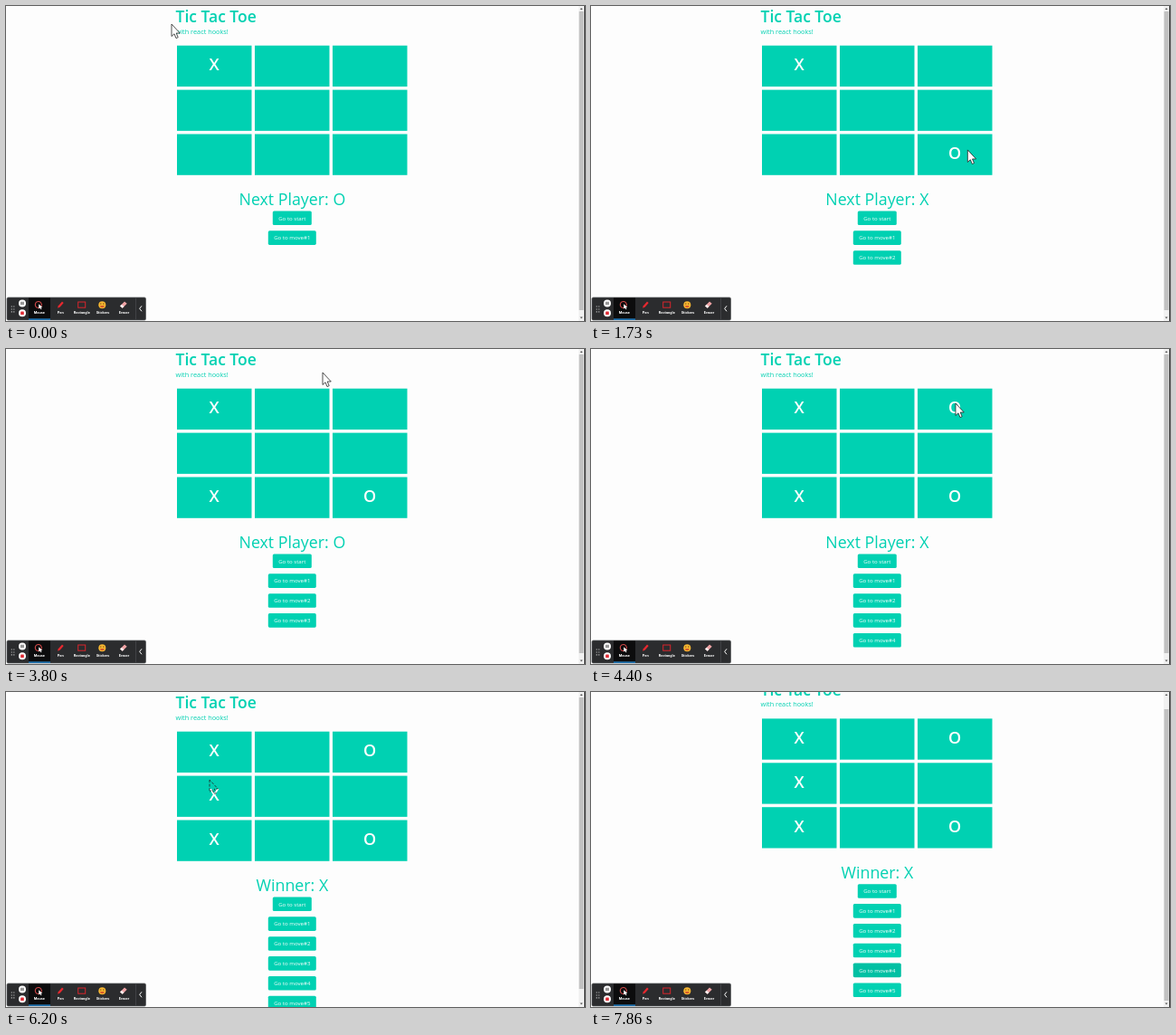
Write an HTML page that moves like this. It is 640 by 348 pixels and loops after 8000 ms.

```html
<!DOCTYPE html>
<html lang="en">
<head>
<meta charset="utf-8">
<title>Tic Tac Toe</title>
<style>
  html, body { margin: 0; width: 100%; height: 100%; overflow: hidden; background: #fdfdfd; }
  svg { display: block; width: 640px; height: 348px; font-family: "Open Sans", "Noto Sans", sans-serif; }
  #page { fill: #00d1b2; }
  .mark { font-size: 18px; font-weight: 600; fill: #fff; text-anchor: middle; }
  .button text { font-size: 6.1px; fill: #fff; text-anchor: middle; }
  #status { font-size: 17.8px; text-anchor: middle; }
  #toolbar text { font: 700 4px Roboto, sans-serif; fill: #fff; text-anchor: middle; }
</style>
</head>
<body>
<svg viewBox="0 0 640 348">
  <rect width="640" height="348" fill="#fdfdfd"/>
  <g id="page">
    <text x="187.5" y="18.3" font-size="17.5" font-weight="600">Tic Tac Toe</text>
    <text x="187.5" y="30.5" font-size="7.35">with react hooks!</text>
    <g id="board"></g>
    <text id="status" x="316.4" y="220"></text>
    <g id="buttons"></g>
  </g>

  <g id="scrollbar">
    <rect x="633" width="6" height="348" fill="#f1f1f1"/>
    <rect id="thumb" x="633.5" width="5" fill="#c1c1c1"/>
    <path d="M634.5 4 L636 2 L637.5 4Z M634.5 343.5 L636 345.5 L637.5 343.5Z" fill="#555"/>
    <rect x="639" width="1" height="348" fill="#444"/>
  </g>

  <circle id="ring" r="12.5" fill="none" stroke="#76635f" stroke-width="1.7"/>
  <path id="cursor" d="M0 0V13.5L3 10.8L5 15.6L7.2 14.6L5.2 10H9.3Z" fill="#fff" stroke="#222" stroke-width=".8"/>

  <g id="toolbar">
    <rect x="1" y="322" width="153.5" height="25" rx="1.5" fill="#2b2c2e" stroke="#55575a" stroke-width=".7"/>
    <rect x="25" y="322.5" width="24" height="24" fill="#0c0c0d"/>
    <rect x="25" y="345.4" width="24" height="1.4" fill="#2185d0"/>
    <path d="M6.3 331.5v7M8.8 331.5v7" stroke="#ccc" stroke-width="1.1" stroke-dasharray="1.1 1.8"/>
    <circle cx="18" cy="328.4" r="4" fill="#fff"/>
    <path d="M17 326.7v3.4M19 326.7v3.4" stroke="#333" stroke-width="1"/>
    <circle cx="18" cy="339.2" r="4" fill="#fff"/>
    <rect x="16.2" y="337.4" width="3.6" height="3.6" rx=".5" fill="#e02b35"/>
    <circle cx="35.8" cy="330" r="3.6" fill="none" stroke="#e8504f" stroke-width="1"/>
    <path d="M36.2 329.2v5.4l1.3-1.2 1.1 1.8.9-.5-1-1.7h1.8Z" fill="#fff"/>
    <path d="M57 333.8L57.8 331.3L62 326.4L63.7 327.9L59.5 332.8Z" fill="#e8282f"/>
    <rect x="79.7" y="327" width="8" height="6.2" fill="none" stroke="#d9252c" stroke-width="1"/>
    <circle cx="106.3" cy="330.3" r="4" fill="#f7b731"/>
    <path d="M104.2 329h1.2M107.2 329h1.2" stroke="#553311" stroke-width="1"/>
    <path d="M104 331h4.6a2.3 2.3 0 0 1-4.6 0Z" fill="#d65a2b"/>
    <path d="M126 331.5L131 326.5L133.7 328.7L128.7 333.7Z" fill="#f0a3a5"/>
    <path d="M126 331.5L127.8 329.7L130.5 331.9L128.7 333.7Z" fill="#f5f0f0"/>
    <path d="M143.5 322.5v24" stroke="#4b4d50" stroke-width=".7"/>
    <path d="M150 331.3L147.7 334.3L150 337.3" fill="none" stroke="#fff" stroke-width="1"/>
    <text x="36.8" y="340.3">Mouse</text>
    <text x="60.2" y="340.3">Pen</text>
    <text x="83.8" y="340.3">Rectangle</text>
    <text x="107" y="340.3">Stickers</text>
    <text x="130.5" y="340.3">Eraser</text>
  </g>
</svg>

<script>
const LOOP = 8000, SCROLL = 14.3, WIN_TIME = 5060;
const $ = id => document.getElementById(id);

function add(parent, tag, attrs, text = "") {
  const node = document.createElementNS("http://www.w3.org/2000/svg", tag);
  for (const key in attrs) node.setAttribute(key, attrs[key]);
  node.textContent = text;
  return parent.appendChild(node);
}

// Each move lands when its click ring ends.
const moves = [
  { time: 0, cell: 0 },
  { time: 1130, cell: 8, ring: [400.3, 164.2, 1000] },
  { time: 2730, cell: 6, ring: [238, 156, 2660] },
  { time: 4330, cell: 2, ring: [403, 66, 4200] },
  { time: WIN_TIME, cell: 3, ring: [247.2, 115.8, 5000] }
];

// time, x, y of the pointer tip
const pointerPath = [
  [0, 183, 20], [60, 183, 20], [860, 441, 160], [1600, 441, 160],
  [1930, 370, 157], [2260, 340, 156], [2400, 197, 147], [2800, 197, 147],
  [3400, 238, 156], [3600, 350, 26], [3800, 350, 26], [4060, 403, 60],
  [4400, 403, 60], [4940, 211, 86], [5060, 211, 86], [5200, 225, 97],
  [6200, 225, 97], [6400, 305, 190], [6660, 316, 300]
];

for (let i = 0; i < 9; i++)
  add($("board"), "rect", {
    x: 189 + i % 3 * 86, y: 43.7 + Math.floor(i / 3) * 48.9, width: 82.5, height: 45.3
  });

moves.forEach((move, i) => {
  move.mark = add($("board"), "text", {
    class: "mark", x: 230.2 + move.cell % 3 * 86, y: 71.4 + Math.floor(move.cell / 3) * 48.9
  }, "XO"[i % 2]);
});

const buttons = Array.from({ length: 6 }, (_, i) => {
  const group = add($("buttons"), "g", { class: "button" });
  const width = i ? 53 : 43, middle = 234.3 + i * 21.85;
  add(group, "rect", { x: 316.3 - width / 2, y: middle - 7.8, width, height: 15.6, rx: 1.6 });
  add(group, "text", { x: 316.3, y: middle + 2.3 }, i ? `Go to move#${i}` : "Go to start");
  return group;
});

const clamp = v => Math.max(0, Math.min(1, v));
const smooth = v => v * v * (3 - 2 * v);
const show = (node, on) => node.setAttribute("visibility", on ? "visible" : "hidden");

function pointerAt(t) {
  const next = pointerPath.findIndex(p => p[0] > t);
  if (next < 0) return pointerPath.at(-1).slice(1);
  const [t0, x0, y0] = pointerPath[next - 1], [t1, x1, y1] = pointerPath[next];
  const k = smooth((t - t0) / (t1 - t0));
  return [x0 + (x1 - x0) * k, y0 + (y1 - y0) * k];
}

function draw(t) {
  const played = moves.filter(m => m.time <= t).length;
  moves.forEach((m, i) => show(m.mark, i < played));
  buttons.forEach((b, i) => show(b, i <= played));
  buttons[4].firstChild.setAttribute("fill", t >= 7530 ? "#00c0a3" : "#00d1b2");
  $("status").textContent = t >= WIN_TIME ? "Winner: X" : `Next Player: ${"XO"[played % 2]}`;

  const scroll = smooth(clamp((t - 6660) / 740));
  $("page").setAttribute("transform", `translate(0 ${-SCROLL * scroll})`);
  $("thumb").setAttribute("y", 6 + 13 * scroll);
  $("thumb").setAttribute("height", t >= WIN_TIME ? 322 : 330);

  const click = moves.find(m => m.ring && t >= m.ring[2] && t < m.time);
  show($("ring"), click);
  if (click) $("ring").setAttribute("transform", `translate(${click.ring[0]} ${click.ring[1]})`);

  // The pointer is see-through and broken while it rests after a click.
  const faded = [[1000, 1600], [2660, 3400], [4940, 6400]].some(([a, b]) => t >= a && t < b);
  const cursor = $("cursor");
  show(cursor, t < 6660);
  cursor.setAttribute("transform", `translate(${pointerAt(t)})`);
  cursor.setAttribute("fill-opacity", faded ? 0 : 1);
  cursor.setAttribute("stroke-dasharray", faded ? "3 1.6" : "none");
}

function frame() {
  draw(performance.now() % LOOP);
  requestAnimationFrame(frame);
}
frame();
</script>
</body>
</html>
```
